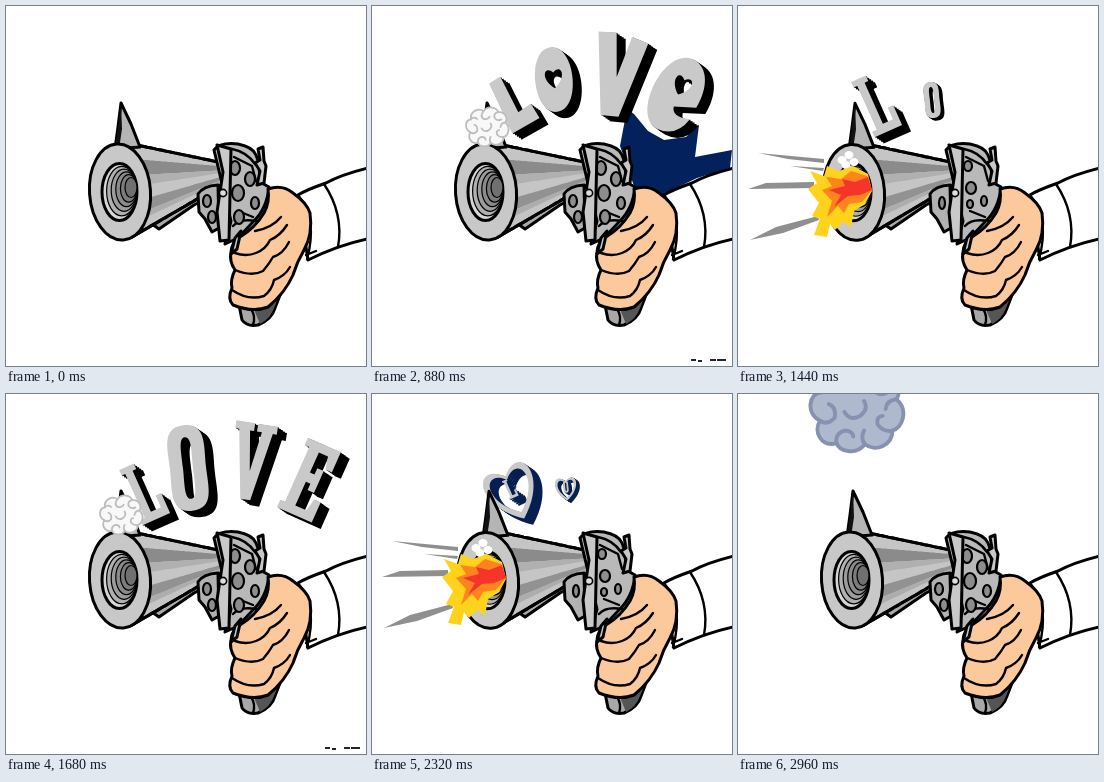
Animation, 360 px wide and 360 px high, one loop 3.04 s. Source, as an HTML page:

```html
<!DOCTYPE html>
<html lang="en">
<head>
<meta charset="utf-8">
<title>Love shot</title>
<style>
html, body { margin: 0; width: 100%; height: 100%; overflow: hidden; background: #fff; }
svg { display: block; width: 100vw; height: 100vh; }
.ink { stroke: #000; stroke-width: 3; stroke-linejoin: round; stroke-linecap: round; }
.line { fill: none; stroke: #000; stroke-width: 2.4; stroke-linecap: round; stroke-linejoin: round; }
</style>
</head>
<body>
<svg viewBox="0 0 360 360">
  <g id="words"></g>
  <g id="barrel"></g>
  <g id="frame">
    <path class="ink" fill="#a8a8a8" d="M233 299L236 314Q241 321 252 319Q266 313 269 302L276 284L240 288Z"/>
    <path fill="#555" d="M247 301L254 318Q264 313 268 302L274 287Z"/>
    <path class="line" d="M245 303Q250 310 247 319"/>
    <path class="ink" fill="#b2b2b2" d="M192 188Q197 180 212 179L213 222L206 226L199 213L193 206Z"/>
    <path class="ink" fill="#b9b9b9" d="M208 144Q214 136 232 138Q247 141 250 149L253 157L254 176L263 181Q261 203 247 216L232 232L219 238L225 215Z"/>
    <path class="ink" fill="#c8c8c8" d="M252 143L257 141L258 155L260 160L258 177L251 179L254 165L249 157L254 154Z"/>
    <path class="line" d="M226 143Q241 146 249 158M228 151L246 160L250 175M232 205L247 211M227 220Q234 212 250 215"/>
    <g id="chambers"></g>
    <path class="ink" fill="#c9c9c9" d="M211 139L225 143L223 234L214 235L211 206L217 166Z"/>
    <circle cx="217" cy="187" r="3.6" fill="#ddd" stroke="#000" stroke-width="1.6"/>
  </g>
  <g id="arm">
    <path class="ink" fill="#fff" d="M292 189Q300 184 320 177Q336 168 366 161V232Q334 238 302 254Z"/>
    <path class="line" d="M292 189Q312 214 301 253M318 178Q338 208 332 241M300 249L310 245"/>
    <path class="ink" fill="#fcc99d" d="M262 183Q276 178 287 187Q301 197 304 207Q307 228 298 244Q291 256 287 269Q279 287 262 301Q247 307 227 299Q221 293 226 282Q224 274 229 264Q223 255 225 246Q226 235 234 231Q249 222 258 207Q264 196 262 183Z"/>
    <path class="ink" fill="#c9c9c9" d="M229 232L235 225L231 243L225 248Z"/>
    <path class="line" d="M229 247Q240 251 250 247Q260 243 264 234Q274 230 281 219M229 264Q246 271 257 265Q263 258 267 251Q277 248 283 236M226 284Q242 295 258 290Q266 284 268 274Q279 270 284 261M249 225Q266 222 275 211"/>
  </g>
  <g id="smoke"></g>
  <g id="flash"></g>
</svg>
<script>
const STEP = 80, LOOP = 3040, SHOT_STARTS = [0, 10, 21];
const layer = id => document.getElementById(id);
const path = (d, fill, extra = '') => `<path d="${d}" fill="${fill}" fill-rule="evenodd" ${extra}/>`;
const ellipse = (x, y, rx, ry, fill, extra = '') =>
  `<ellipse cx="${x}" cy="${y}" rx="${rx}" ry="${ry}" fill="${fill}" ${extra}/>`;
const group = (transform, body) => `<g transform="${transform}">${body}</g>`;

// Barrel pose by phase: muzzle pull-back, bulge position, bulge height
const REST = [0, 190, 0];
const POSES = [REST, [3, 205, 3], [6, 202, 7], [9, 196, 12], [11, 187, 15], [7, 166, 13], [3, 146, 8], [2, 190, 0]];

function drawBarrel([pull, bulgeX, bulge]) {
  const left = 126 + pull, right = 217;
  const edge = (x, f) => {
    const k = (x - left) / (right - left);
    const top = 138 + 19 * k, bottom = 231 - 53 * k;
    const bump = bulge * Math.exp(-(((x - bulgeX) / 8) ** 2));
    return top + (bottom - top) * f - bump * (1 - 2 * f);
  };
  const band = (from, to) => {
    const a = [], b = [];
    for (let i = 0; i <= 30; i++) {
      const x = left + (right - left) * i / 30;
      a.push(`${x.toFixed(1)} ${edge(x, from).toFixed(1)}`);
      b.unshift(`${x.toFixed(1)} ${edge(x, to).toFixed(1)}`);
    }
    return `M${a.join('L')}L${b.join('L')}Z`;
  };
  const hole = [0, 1, 2, 3, 4, 5].map(n => {
    const rx = 17.5 - 2.3 * n;
    return ellipse(131 - rx, 186 - n * .9, rx, 28.5 - 3.7 * n,
      ['#d6d6d6', '#b0b0b0', '#9c9c9c', '#8a8a8a', '#7c7c7c', '#707070'][n], `stroke="#000" stroke-width="${n ? 1.2 : 3}"`);
  }).join('');
  layer('barrel').innerHTML =
    path('M146 218L153 223L188 199L206 190L206 181Z', '#aaa', 'class="ink"') +
    path(band(0, 1), '#c5c5c5', 'class="ink"') +
    path(band(.16, .34), '#8b8b8b') + path(band(.34, .46), '#b0b0b0') +
    path(band(.63, .78), '#929292') + path(band(.78, .86), '#adadad') +
    path(band(0, 1), 'none', 'class="ink"') +
    group(`translate(${pull} ${pull / 6})`,
      path('M109 143L112 121L115 97L125 118L134 141Z', '#b5b5b5', 'class="ink"') +
      path('M109 143L112 121L115 97L116 123L113 143Z', '#111') +
      ellipse(114, 186, 30.5, 48, '#c8c8c8', 'class="ink" transform="rotate(-4 114 186)"') + hole);
}

function drawChambers(turned) {
  const holes = turned
    ? [[233, 182, 5, 6], [230, 160, 4, 5], [246, 195, 3, 5], [232, 198, 3, 4], [204, 197, 3, 6]]
    : [[232, 187, 6, 8], [229, 162, 5, 7], [244, 173, 5, 7], [233, 211, 5, 7], [249, 197, 4, 6], [201, 195, 4, 6], [206, 211, 4, 6]];
  layer('chambers').innerHTML = holes.map(([x, y, rx, ry]) =>
    ellipse(x, y, rx, ry, '#8d8d8d', 'stroke="#000" stroke-width="2.2"')).join('');
}

// Lettering
const heart = (s, x = 0, y = 0) => {
  const p = (a, b) => `${x + a * s} ${y + b * s}`;
  return `M${p(0, 30)}C${p(-42, -2)} ${p(-24, -42)} ${p(0, -16)}C${p(24, -42)} ${p(42, -2)} ${p(0, 30)}Z`;
};
const FUNKY = [
  'M-13 -27L0 -29L2 11L17 8L19 25L-12 28Z',
  'M0 -33C25 -33 25 32 0 32C-25 32 -25 -33 0 -33Z' + heart(.34, 0, -2),
  'M-25 -40L-7 -42L0 2L9 -40L26 -36L8 41L-10 42Z',
  'M25 4L4 12Q6 23 24 17Q18 40 -3 39C-32 36 -29 -40 3 -39C20 -38 28 -18 25 4Z' + heart(.34, 3, -11)
];
const SLAB = [
  'M-16 -30h16v6h-4v45h11v-13h6v22h-30v-6h5v-48h-4z',
  'M0 -43C23 -43 18 -20 18 0C18 20 23 43 0 43C-23 43 -18 20 -18 0C-18 -20 -23 -43 0 -43ZM0 -31C-7 -31 -5 -15 -5 0C-5 15 -7 31 0 31C7 31 5 15 5 0C5 -15 7 -31 0 -31Z',
  'M-21 -40h19v8h-4l6 40l6 -40h-5v-8h20v8h-4l-12 69h-10l-12 -69h-4z',
  'M-19 -40h36v22h-7l-3 -13h-10v22h5v-7h7v24h-7v-7h-5v26h12l3 -13h7v22h-38v-8h5v-60h-5z'
];
const glyph = (style, i, fill) => style < 2
  ? path([FUNKY, SLAB][style][i], fill)
  : path(heart(1) + heart(.77), fill) + group('translate(0 -3) scale(.33)', path(SLAB[i], fill));
const SPOTS = [[140, 97, -24], [182, 74, -6], [245, 69, 9], [303, 88, 24]];
const GROWTH = { 7: [1, .42, 0, 0], 8: [1, 1, .5, 0], 9: [1, 1, 1, .7] };

function drawWords(style, phase) {
  const age = phase - 10;
  if (phase < 7 || age > 4) return '';
  const growth = GROWTH[phase] || [1, 1, 1, 1];
  const faded = age >= 3;
  const shadow = style === 2 ? '#061f50' : '#000';
  const letters = SPOTS.map(([x, y, turn], i) => {
    const size = growth[i] * (faded ? .94 : 1);
    if (!size) return '';
    if (growth[i] < 1) { x += 12; y += 20; }
    const at = off => `translate(${x + off} ${y + off * .7}) rotate(${turn}) scale(${size})`;
    if (faded) return group(at(3), glyph(style, i, '#08296a'));
    const depth = [9, 7, 5, 3, 1].map(d => group(at(d * growth[i]), glyph(style, i, shadow))).join('');
    return depth + group(at(0), glyph(style, i, age > 0 ? '#8f9bb3' : '#c9c9c9'));
  }).join('');
  const spill = style === 0 && age === 0
    ? path('M255 103L262 108L276 125L292 134L314 131L327 119L323 151L360 144L358 162L325 172L300 184L290 191L262 180L248 140Z', '#03215c') : '';
  const specks = age >= 0 ? path('M319 353h5v2h-5zM326 354h4v2h-4zM338 353h6v2h-6zM345 353h9v2h-9z', '#223') : '';
  return spill + `<g opacity="${age === 4 ? .76 : 1}">${letters}</g>` + specks;
}

// Smoke, by age: centre height, width, fill, outline
const PUFFS = {
  '-2': [132, 20, '#fff', '#ccc'], '-1': [128, 32, '#fff', '#c8c8c8'],
  0: [121, 44, '#f8f8f8', '#bdbdbd'], 1: [113, 53, '#f1f2f5', '#b8bcc6'],
  2: [100, 63, '#e7e9ef', '#afb5c3'], 3: [79, 73, '#dfe2ea', '#a8b0c1'],
  4: [51, 83, '#d9dde8', '#a4acbe'], 5: [15, 96, '#afb9ce', '#8792b0'], 6: [-25, 106, '#a5b0c8', '#7f8bab']
};
const CLOUD = 'M-37 12C-52 4 -48 -16 -36 -17C-38 -37 -17 -43 -8 -35C2 -49 22 -44 25 -33C41 -35 47 -18 41 -10C54 1 47 20 37 22C37 38 19 44 9 36C-1 48 -17 43 -20 35C-36 39 -44 23 -37 12Z';
const CURLS = 'M-36 -17Q-30 -24 -22 -18M-8 -35Q-16 -25 -8 -18Q2 -16 6 -23M25 -33Q14 -31 17 -20Q24 -12 32 -17M41 -10Q31 -9 30 0M-37 12Q-29 17 -22 9Q-20 -2 -28 -5M-12 3Q-6 13 4 7Q13 0 8 -8M37 22Q28 24 22 16Q20 8 27 7M9 36Q4 30 8 22M-20 35Q-22 25 -12 22Q-4 22 -3 28';

function drawSmoke(age) {
  const puff = PUFFS[age];
  if (!puff) return '';
  const [y, width, fill, edge] = puff;
  const pen = `stroke="${edge}" stroke-width="4" stroke-linecap="round"`;
  return group(`translate(${115 + Math.max(0, Math.min(age, 4)) * .8} ${y}) scale(${width / 98})`,
    path(CLOUD, fill, pen) + path(CURLS, 'none', pen));
}

function drawFlash(phase) {
  if (phase !== 7) return '';
  const streaks = 'M20 147L86 153L86 157L50 153ZM52 160L86 162L85 165ZM10 183L28 177L76 176L76 182ZM12 234L38 221L80 210L81 214L45 227Z';
  return path(streaks, '#8f8f8f') +
    [[104, 154], [111, 149], [116, 156], [108, 159]].map(([x, y]) => ellipse(x, y, 4.5, 4, '#fff')).join('') +
    path('M70 183L79 177L72 165L86 170L89 160L101 165L115 160L130 168L134 185L127 198L116 205L113 221L105 216L97 224L92 218L89 231L76 229L82 213L74 210L81 197Z', '#ffd21c') +
    path('M84 184L94 180L88 171L103 173L113 165L129 170L134 184L124 196L111 198L106 207L100 200L89 211L94 195Z', '#ff8420') +
    path('M91 184L107 180L104 173L117 176L130 171L134 184L122 189L110 190L96 201L103 189Z', '#f5352a');
}

function draw(step) {
  const phases = SHOT_STARTS.map(start => step - start);
  const current = phases.filter(p => p >= 0).pop();
  const each = fn => phases.map(fn).join('');
  drawBarrel(POSES[current] || REST);
  drawChambers(current > 0 && current < 8);
  layer('words').innerHTML = each((p, style) => drawWords(style, p));
  layer('smoke').innerHTML = each(p => drawSmoke(p - 10));
  layer('flash').innerHTML = each(p => drawFlash(p));
}

const began = performance.now();
let shown = -1;
function tick() {
  const time = (performance.now() - began) % LOOP;
  const step = Math.max(0, Math.floor(time / STEP) - 1);
  if (step !== shown) draw(shown = step);
  requestAnimationFrame(tick);
}
tick();
</script>
</body>
</html>
```
